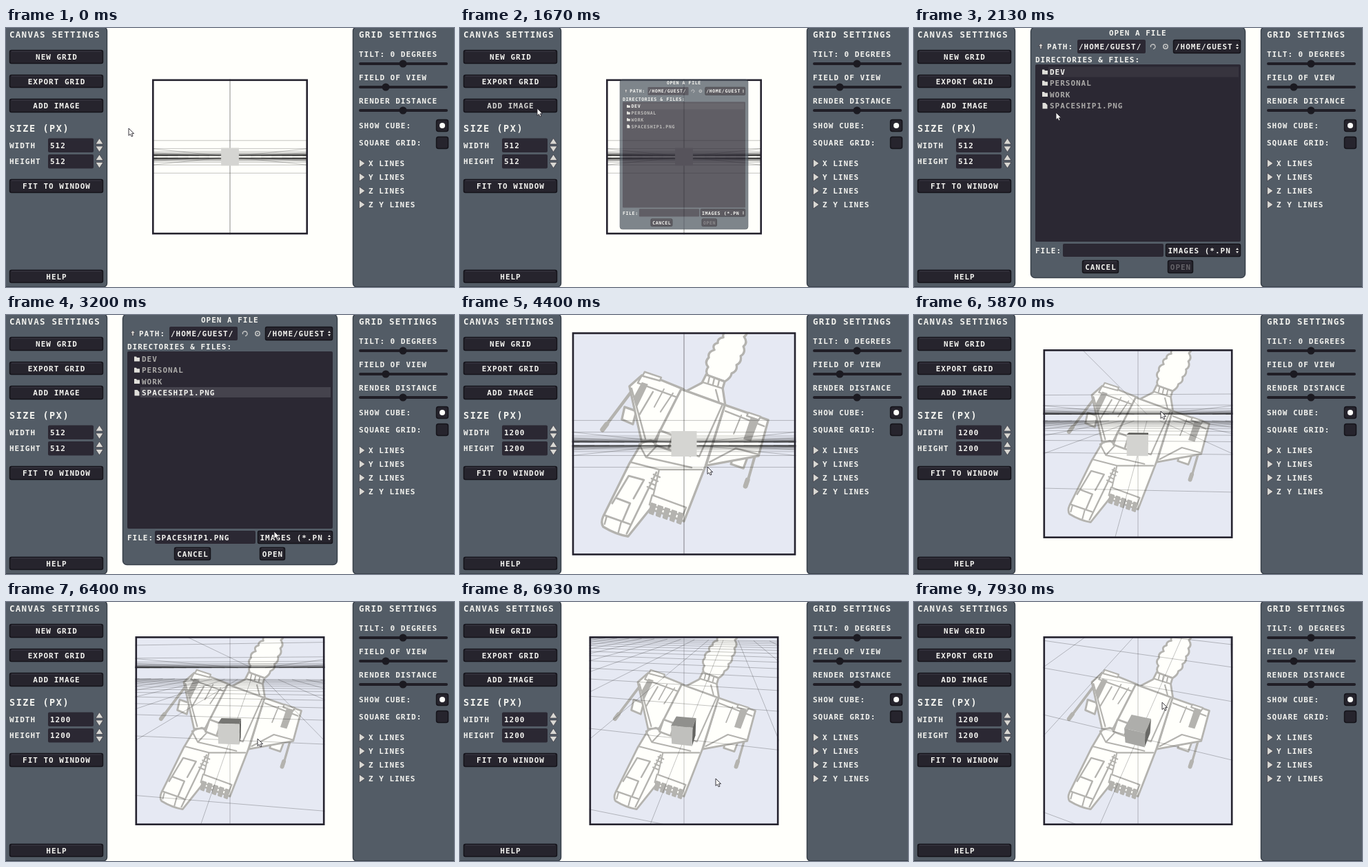
An HTML page with a canvas for the animation above (8000 ms loop, 650 px wide and 377 px high).

```html
<!DOCTYPE html>
<html lang="en">
<head>
<meta charset="utf-8">
<title>Perspective grid tool</title>
<style>
html, body { margin: 0; width: 100%; height: 100%; overflow: hidden; background: #fffffb; }
canvas, svg { position: absolute; left: 0; top: 0; width: 650px; height: 377px; }
text {
  font: bold 11px "DejaVu Sans Mono", "Liberation Mono", monospace;
  letter-spacing: .98px; fill: #f3f3ef; white-space: pre;
}
text.head { font-size: 12.5px; letter-spacing: 1.27px; }
text.big { font-size: 13.5px; letter-spacing: 1.55px; }
text.dim { fill: #aaa9a7; }
.panel { fill: #535c66; stroke: #39414b; stroke-width: 1.5; }
.btn { fill: #26242d; stroke: #15141b; stroke-width: 1.5; }
.btn.press { fill: #191820; }
.edge { stroke: #3d3b46; stroke-width: 1; }
.field { fill: #2b2833; }
.light { fill: #d9d8d3; stroke: #2a2833; stroke-width: .6; }
</style>
</head>
<body>
<canvas id="view" width="650" height="377"></canvas>
<svg id="ui" viewBox="0 0 650 377"></svg>
<script>
const LOOP = 8000, STEP = 1000 / 15;
const CX = 325, CY = 187.5;
const ui = document.getElementById('ui');
const ctx = document.getElementById('view').getContext('2d');

// ---------- interface ----------
function el(parent, tag, attrs, text) {
  const n = document.createElementNS('http://www.w3.org/2000/svg', tag);
  for (const k in attrs) n.setAttribute(k, attrs[k]);
  if (text !== undefined) n.textContent = text;
  return parent.appendChild(n);
}
const rect = (p, cls, x, y, x2, y2, rx = 2) =>
  el(p, 'rect', { class: cls, x, y, width: x2 - x, height: y2 - y, rx });
const label = (p, x, y, s, cls = '') => el(p, 'text', { x, y: y + 4, class: cls }, s);
const path = (p, cls, d) => el(p, 'path', { class: cls, d });

function button(p, x, y, x2, y2, s) {
  const box = rect(p, 'btn', x + .5, y + .5, x2 - .5, y2 - .5, 2.5);
  path(p, 'edge', `M${x + 3} ${y + 2}H${x2 - 3}`);
  const text = label(p, (x + x2 - s.length * 7.6) / 2 + .5, (y + y2) / 2, s);
  return { box, text };
}
const updown = (p, x, y) =>
  el(p, 'path', { d: `M${x - 2} ${y - 1}l2-3 2 3zM${x - 2} ${y + 1}l2 3 2-3z`, fill: '#e3e2de' });

function spinner(y) {
  label(ui, 5, y, y < 180 ? 'WIDTH' : 'HEIGHT');
  rect(ui, 'field', 61, y - 10, 127, y + 10.5);
  path(ui, 'light', `M130 ${y - 1.5}L135.5 ${y - 10}L141 ${y - 1.5}z`);
  path(ui, 'light', `M130 ${y + 1.5}L135.5 ${y + 10}L141 ${y + 1.5}z`);
  return label(ui, 64, y, '512');
}

rect(ui, 'panel', -8, -1, 146.5, 376.8, 5);
rect(ui, 'panel', 503.5, -1, 658, 376.8, 5);
label(ui, 5, 10, 'CANVAS SETTINGS', 'head');
button(ui, 5, 32, 141, 52, 'NEW GRID');
button(ui, 5, 68, 141, 87, 'EXPORT GRID');
const add = button(ui, 5, 103, 141, 123, 'ADD IMAGE');
label(ui, 5, 147, 'SIZE (PX)', 'big');
const sizes = [spinner(170.5), spinner(194)];
button(ui, 5, 220, 141, 240, 'FIT TO WINDOW');
button(ui, 5, 352, 141, 371, 'HELP');

label(ui, 512, 10, 'GRID SETTINGS', 'head');
[['TILT: 0 DEGREES', 576], ['FIELD OF VIEW', 551], ['RENDER DISTANCE', 576]].forEach(([s, x], i) => {
  const y = 52 + 34 * i;
  label(ui, 512, y - 14, s);
  el(ui, 'rect', { x: 512, y: y - 2, width: 129, height: 4, rx: 2, fill: '#201e26' });
  el(ui, 'circle', { cx: x, cy: y, r: 5.5, fill: '#1b1a21' });
});
['SHOW CUBE:', 'SQUARE GRID:'].forEach((s, i) => {
  label(ui, 512, 142 + 25 * i, s);
  rect(ui, 'btn', 624.5, 133.5 + 25 * i, 641.5, 150.5 + 25 * i, 3);
});
el(ui, 'circle', { cx: 633, cy: 142, r: 4, fill: '#fffffb' });
['X', 'Y', 'Z', 'Z Y'].forEach((s, i) => {
  const y = 197 + 20 * i;
  path(ui, 'light', `M512.5 ${y - 6}L521 ${y}L512.5 ${y + 6}z`);
  label(ui, 526, y, s + ' LINES');
});

// ---------- file dialog ----------
const dlg = el(ui, 'g', {});
rect(dlg, 'panel', 169.5, -1, 480.5, 363.5, 6);
label(dlg, 283, 7, 'OPEN A FILE');
path(dlg, 'light', 'M180.5 26.5l3.5-4 3.5 4h-2.3v4h-2.4v-4z');
label(dlg, 193, 27, 'PATH:');
rect(dlg, 'field', 237, 17, 336, 37);
label(dlg, 239, 27, '/HOME/GUEST/');
el(dlg, 'path', { d: 'M343.5 25v3M344 25a3.4 3.4 0 1 1 3 5.5', fill: 'none', stroke: '#c4c5c4', 'stroke-width': 1.4 });
el(dlg, 'circle', { cx: 365, cy: 27, r: 3.2, fill: 'none', stroke: '#c4c5c4', 'stroke-width': 1.5 });
el(dlg, 'circle', { cx: 365, cy: 27, r: 1, fill: '#c4c5c4' });
rect(dlg, 'btn', 376.5, 17.5, 473.5, 36.5);
label(dlg, 379, 27, '/HOME/GUEST');
updown(dlg, 469, 27);
label(dlg, 176, 46, 'DIRECTORIES & FILES:');
rect(dlg, 'field', 176, 53, 474, 311);
const row = el(dlg, 'rect', { x: 195, width: 276, height: 15, fill: '#45434d' });
const items = ['DEV', 'PERSONAL', 'WORK', 'SPACESHIP1.PNG'].map((s, i) => {
  const y = 64 + 16.3 * i;
  el(dlg, 'path', {
    fill: '#e0dfda',
    d: i < 3 ? `M186 ${y - 3.5}h3l1 1.5h4v5.5h-8z` : `M186.5 ${y - 4}h4l3 3v5.5h-7z`
  });
  return label(dlg, 197, y, s, 'dim');
});
label(dlg, 176, 324, 'FILE:');
rect(dlg, 'field', 216, 314, 362, 333);
const fileName = label(dlg, 218, 324, 'SPACESHIP1.PNG');
rect(dlg, 'btn', 365.5, 314.5, 473.5, 332.5);
label(dlg, 368.5, 324, 'IMAGES (*.PN');
updown(dlg, 469, 324);
button(dlg, 244, 338, 297, 357, 'CANCEL');
const open = button(dlg, 368, 338, 405, 357, 'OPEN');

const cursor = el(ui, 'path', {
  d: 'M0 0V10.5L2.4 8.4L4.2 12L6 11.2L4.4 7.7H7.6Z',
  fill: '#fffffb', stroke: '#25232c', 'stroke-width': .9
});

// ---------- motion tables: [time, values...] ----------
const MOUSE = [
  [0, 178, 146], [270, 178, 146], [470, 198, 170], [730, 162, 139], [870, 162, 139],
  [930, 112, 117], [1670, 112, 117], [2130, 206, 123], [2270, 206, 123], [2330, 233, 108],
  [2870, 233, 108], [3200, 389, 315], [3330, 389, 344], [3670, 389, 344], [4000, 359, 221],
  [4600, 359, 221], [5200, 356, 98], [5400, 356, 98], [5870, 358, 140], [6930, 371, 257],
  [7070, 371, 257], [7400, 362, 104], [7930, 360, 146]
];
const DIALOG = [
  [1400, 0, 0], [1670, .6, .75], [1800, .9, .96], [1930, 1, 1],
  [3600, 1, 1], [3730, .75, .8], [3870, .35, .4], [4000, 0, 0]
];
const POSE = [
  [5330, 0, 0], [5870, 8.5, 3.1], [6400, 18, 7], [6930, 30, 12],
  [7330, 32, 13], [7930, 46, 18]
];
function at(table, t) {
  if (t <= table[0][0]) return table[0].slice(1);
  for (let i = 1; i < table.length; i++) {
    const a = table[i - 1], b = table[i];
    if (t <= b[0]) {
      const u = (t - a[0]) / (b[0] - a[0]);
      return a.slice(1).map((v, j) => v + (b[j + 1] - v) * u);
    }
  }
  return table[table.length - 1].slice(1);
}

// ---------- ship, drawn on a stage where the picture is 324 wide ----------
const INK = '#b4b3af', PAPER = '#fffffb';
function shape(d, fill = PAPER, w = 3.3) {
  const p = new Path2D(d);
  if (fill) { ctx.fillStyle = fill; ctx.fill(p); }
  if (w) { ctx.strokeStyle = INK; ctx.lineWidth = w; ctx.stroke(p); }
}
function drawShip() {
  ctx.lineJoin = ctx.lineCap = 'round';
  // exhaust
  shape('M360 89Q355 82 360 76Q354 69 361 62Q359 54 369 51Q365 43 374 41Q373 34 382 33Q380 26 388 20' +
    'L416 20Q418 28 412 32Q418 41 411 46Q415 55 407 60Q409 69 401 73Q403 82 394 85Q393 92 384 97Z');
  // engine
  shape('M326 112L351 99L357 87L384 97L381 107L385 133Z');
  shape('M352 98L381 107M362 90L360 99M369 92L367 101M376 95L374 104M371 109L376 128', null, 2.4);
  // guns and pods
  shape('M253 106L211 162', null, 4.5);
  shape('M207 167L213 159', null, 7);
  shape('M440 162L416 246', null, 4);
  shape('M414 249L417 240', null, 7);
  shape('M239 134L256 140L251 159L235 152Z');
  shape('M397 202L417 207L411 223L393 217Z');
  // wings
  shape('M246 104L264 88L292 95L324 108L286 196L264 186Z');
  shape('M384 131L447 153L433 205L357 219Z');
  shape('M249 107L269 180M264 88L258 99L318 121M260 146L280 112M433 203L400 194L362 214M441 162L385 140', null, 2.5);
  shape('M268 83L292 91L290 96L265 89ZM418 142L436 148L433 153L416 147Z', PAPER, 2.5);
  shape('M264 98L273 101L257 134L252 120ZM422 148L434 152L422 184L411 181Z', INK, 0);
  shape('M296 108L282 134M309 114L291 141M408 146L397 173', null, 2);
  // fuselage
  shape('M321 108L384 131L356 220L325 300L276 282L244 322Q226 319 208 308Q204 302 208 293L246 216L265 184L283 183Z');
  shape('M320 110L282 184L347 206L380 132', null, 2.5);
  shape('M290 168L309 175L302 196L283 189ZM309 175L341 187L334 205L302 196');
  shape('M260 188L277 182L286 190L270 207ZM247 214L289 225L351 225M289 225L276 282M270 207L336 222', null, 2.5);
  // nose
  shape('M285 229L242 318M209 291L246 304M226 266L247 274L236 300M221 274L245 234L267 240L252 267', null, 2.8);
  shape('M213 293L210 304M234 301L230 316', null, 2.5);
  for (let i = 0; i < 4; i++) shape(`M${281 - i * 3} ${232 + i * 6}l9 4`, null, 2.5);
  // cooling fins
  shape('M279 262L328 280L323 292L275 276Z', PAPER, 2.5);
  for (let i = 0; i < 5; i++) {
    const x = 278 + i * 10, y = 274 + i * 3.4;
    shape(`M${x} ${y}l6 2l-4 14l-5-2z`, INK, 2.4);
  }
}

// ---------- grid ----------
const DIST = 2, GAP = .105, FAR = 13, NEAR = .04, SIDE = .108;
function camera(W, pitch, yaw) {
  const r = Math.PI / 180;
  const sp = Math.sin(pitch * r), cp = Math.cos(pitch * r), sy = Math.sin(yaw * r), cy = Math.cos(yaw * r);
  return {
    sp, cp, sy, cy,
    turn(x, y, z) {
      const a = x * cy + z * sy, b = z * cy - x * sy;
      return [a, y * cp - b * sp, y * sp + b * cp + DIST];
    },
    flat: ([x, y, z]) => [CX + W * x / z, CY + W * y / z]
  };
}
function line3(cam, p, q) {
  let a = cam.turn(...p), b = cam.turn(...q);
  if (a[2] < NEAR && b[2] < NEAR) return;
  if (a[2] > b[2]) [a, b] = [b, a];
  if (a[2] < NEAR) {
    const u = (NEAR - a[2]) / (b[2] - a[2]);
    a = a.map((v, i) => v + (b[i] - v) * u);
  }
  ctx.beginPath();
  ctx.moveTo(...cam.flat(a));
  ctx.lineTo(...cam.flat(b));
  ctx.stroke();
}
function drawGrid(cam, W) {
  ctx.strokeStyle = 'rgba(0,0,0,.4)';
  ctx.lineWidth = .6;
  for (const y of [GAP, -GAP - DIST * cam.sp])
    for (let k = -FAR; k <= FAR; k++) {
      line3(cam, [-FAR, y, k], [FAR, y, k]);
      line3(cam, [k, y, -FAR], [k, y, FAR]);
    }
  ctx.beginPath();
  ctx.moveTo(CX, CY - W);
  ctx.lineTo(CX, CY + W);
  ctx.stroke();
}
function drawCube(cam) {
  const s = SIDE;
  // each face is lit from the eye
  const face = (facing, pts) => {
    const tone = Math.round(75 + 138 * facing);
    ctx.fillStyle = `rgb(${tone},${tone},${tone - 3})`;
    ctx.beginPath();
    pts.forEach(p => ctx.lineTo(...cam.flat(cam.turn(...p))));
    ctx.fill();
  };
  const side = cam.sy * cam.cp;
  if (DIST * cam.sp > s) face(cam.sp, [[-s, -s, -s], [s, -s, -s], [s, -s, s], [-s, -s, s]]);
  if (DIST * side > s) face(side, [[s, -s, -s], [s, s, -s], [s, s, s], [s, -s, s]]);
  face(cam.cp * cam.cy, [[-s, -s, -s], [s, -s, -s], [s, s, -s], [-s, s, -s]]);
}
function drawView(t) {
  const loaded = t >= 3670;
  const clicks = Math.max(0, Math.min(8, Math.round((t - 4000) / STEP)));
  const W = loaded ? 534 / Math.pow(1.0865, clicks) : 226;
  const h = W / 2;
  ctx.clearRect(0, 0, 650, 377);
  ctx.save();
  ctx.beginPath();
  ctx.rect(CX - h, CY - h, W, W);
  ctx.clip();
  ctx.fillStyle = loaded ? '#e6e9f3' : '#fffffb';
  ctx.fillRect(0, 0, 650, 377);
  if (loaded) {
    ctx.save();
    ctx.translate(CX, CY);
    ctx.scale(W / 324, W / 324);
    ctx.translate(-CX, -CY);
    drawShip();
    ctx.restore();
  }
  const cam = camera(W, ...at(POSE, t));
  drawGrid(cam, W);
  drawCube(cam);
  ctx.restore();
  ctx.strokeStyle = '#25232e';
  ctx.lineWidth = 2.6;
  ctx.lineJoin = 'miter';
  ctx.strokeRect(CX - h + 1.3, CY - h + 1.3, W - 2.6, W - 2.6);
}

// ---------- playback ----------
function drawUi(t) {
  const [x, y] = at(MOUSE, t);
  cursor.setAttribute('transform', `translate(${Math.round(x)} ${Math.round(y)})`);
  add.text.style.fill = t >= 870 && t < 1800 ? '#d2d2cf' : '';
  add.box.classList.toggle('press', t >= 1400 && t < 1530);
  sizes.forEach(n => n.textContent = t >= 3670 ? '1200' : '512');

  const [s, a] = at(DIALOG, t);
  dlg.setAttribute('transform', `translate(325 188) scale(${s}) translate(-325 -188)`);
  dlg.setAttribute('opacity', a);
  dlg.style.display = a > 0 ? '' : 'none';
  const picked = t >= 2600;
  row.setAttribute('y', picked ? 105 : 56.5);
  row.setAttribute('opacity', picked ? 1 : .45);
  items.forEach((n, i) => n.classList.toggle('dim', i !== (picked ? 3 : 0)));
  fileName.style.display = picked ? '' : 'none';
  open.text.style.opacity = picked ? 1 : .3;
  open.box.classList.toggle('press', t >= 3470);
}
function frame(now) {
  const t = Math.floor(((now % LOOP) + 4) / STEP) * STEP + 2;
  drawView(t);
  drawUi(t);
  requestAnimationFrame(frame);
}
frame(0);
</script>
</body>
</html>
```
